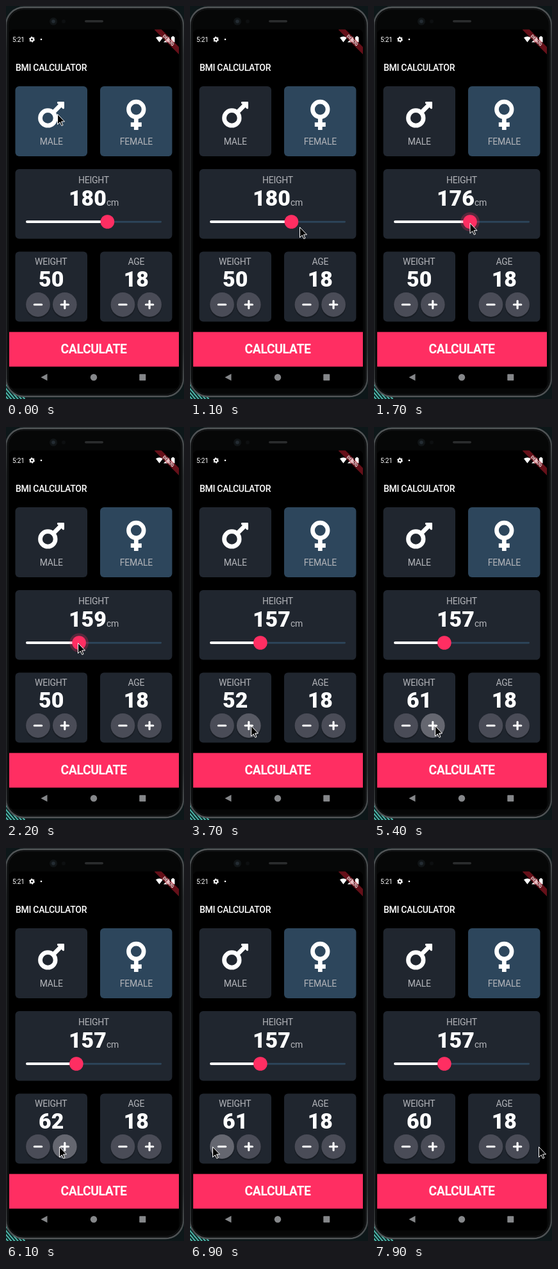
An HTML page for the animation above (8 s loop, 278 by 612 pixels).

```html
<!DOCTYPE html>
<html lang="en">
<head>
<meta charset="utf-8">
<title>BMI Calculator</title>
<style>
  html, body { margin: 0; width: 100%; height: 100%; overflow: hidden; background: #0d1719; }
  svg { display: block; width: 278px; height: 612px; }
  text { font-family: Roboto, sans-serif; fill: #fff; }
  .mid { text-anchor: middle; }
  .label { font-size: 14px; font-weight: 400; letter-spacing: -.25px; fill: #b2b4b9; }
  .number { font-size: 33.9px; font-weight: 900; letter-spacing: 0; }
  .card { fill: #20262f; }
  .active { fill: #2d465c; }
  .accent { fill: #ff2e62; }
  .icon { fill: none; stroke: #fff; stroke-width: 6.75; }
  .button { fill: #4a4c57; }
  .sign { stroke: #fff; stroke-width: 3.2; stroke-linecap: round; }
  .nav { fill: #85878a; }
</style>
</head>
<body>
<svg viewBox="0 0 278 612">
  <defs>
    <pattern id="hatch" width="4" height="4" patternUnits="userSpaceOnUse" patternTransform="rotate(-40)">
      <rect width="4" height="4" fill="#0c2626"/>
      <rect width="1.8" height="4" fill="#55c4b6"/>
    </pattern>
    <linearGradient id="rim" x2="0" y2="1">
      <stop stop-color="#54585a"/>
      <stop offset=".12" stop-color="#2b2e30"/>
      <stop offset=".88" stop-color="#2b2e30"/>
      <stop offset="1" stop-color="#515557"/>
    </linearGradient>
    <clipPath id="screen"><rect x="5" y="36.5" width="265" height="559" rx="7"/></clipPath>
    <g id="round">
      <circle cy="2" r="19.4" fill="#000" opacity=".22"/>
      <circle class="button" r="18.9"/>
    </g>
    <path id="minus" class="sign" d="M-5.7 0H5.7"/>
    <path id="plus" class="sign" d="M-5.7 0H5.7M0-5.7V5.7"/>
  </defs>

  <!-- phone shell -->
  <rect y="588" width="30" height="24" fill="url(#hatch)"/>
  <rect x="0" y="2" width="277" height="606" rx="28" fill="#0b0c0d" stroke="url(#rim)" stroke-width="2.4"/>
  <rect x="3" y="5" width="271" height="600" rx="25" fill="#060707" stroke="#17191a"/>
  <circle cx="74" cy="24" r="6" fill="#111517"/>
  <circle cx="74" cy="24" r="2.8" fill="#242c33"/>
  <circle cx="90" cy="24" r="3" fill="#0d0f10"/>
  <rect x="123" y="22" width="29" height="3.6" rx="1.8" fill="#2b2d2e"/>
  <rect x="5" y="36.5" width="265" height="559" rx="7" fill="#000"/>

  <!-- status bar -->
  <text x="10" y="55.6" font-size="10" letter-spacing="-.15">5:21</text>
  <circle cx="40.5" cy="52" r="2.5" fill="none" stroke="#fff" stroke-width="2"/>
  <circle cx="40.5" cy="52" r="3.8" fill="none" stroke="#fff" stroke-width="1.3" stroke-dasharray="2 1.98"/>
  <circle cx="55" cy="52" r="1.3" fill="#fff"/>
  <path d="M234 49.3Q239.5 45.5 245 49.3L239.5 56.5ZM255 47.5V56.5H246ZM258 48.3H259.6V47H261.9V48.3H263.5V56.5H258Z" fill="#fff"/>
  <g clip-path="url(#screen)">
    <g transform="translate(270 37) rotate(45)">
      <rect x="-27" y="18.9" width="54" height="8.1" fill="#a81c2a" opacity=".6"/>
      <text class="mid" y="25.4" font-size="6.9" font-weight="900" opacity=".8">DEBUG</text>
    </g>
  </g>

  <text x="15" y="101.3" font-size="14" font-weight="500" letter-spacing="-.3">BMI CALCULATOR</text>

  <!-- gender -->
  <rect id="male" class="card" x="14.5" y="125" width="112.5" height="109" rx="6"/>
  <g class="icon">
    <circle cx="65.3" cy="174.4" r="11.8"/>
    <path d="M75 164.7L86 153.7"/>
  </g>
  <path d="M81 149H90Q91 149 91 150V159Q90.4 161 88.7 159.9L80.1 151.2Q79.2 149.4 81 149Z" fill="#fff"/>
  <text class="label mid" x="70.7" y="216.3">MALE</text>

  <rect class="active" x="147" y="125" width="112.5" height="109" rx="6"/>
  <g class="icon">
    <circle cx="203.3" cy="161" r="11.8"/>
    <path d="M203.3 174V193M194.8 184.6H211.8"/>
  </g>
  <text class="label mid" x="203.3" y="216.3">FEMALE</text>

  <!-- height -->
  <rect class="card" x="14.5" y="254" width="245" height="108.5" rx="6"/>
  <text class="label mid" x="137" y="276.3">HEIGHT</text>
  <text class="mid" x="137" y="310.6"><tspan id="height" class="number">180</tspan><tspan class="label">cm</tspan></text>
  <rect class="active" x="32" y="334.7" width="211" height="2.7" rx="1.3"/>
  <rect id="track" x="31" y="334" height="4" rx="2" fill="#fff"/>
  <g id="thumb">
    <circle id="ripple" class="accent" r="14.8"/>
    <circle class="accent" r="10.8"/>
  </g>

  <!-- weight and age -->
  <rect class="card" x="14.5" y="382.5" width="112.5" height="109" rx="6"/>
  <text class="label mid" x="70.3" y="402.6">WEIGHT</text>
  <text id="weight" class="number mid" x="70.7" y="436.7">50</text>
  <rect class="card" x="147" y="382.5" width="112.5" height="109" rx="6"/>
  <text class="label mid" x="203.3" y="402.6">AGE</text>
  <text class="number mid" x="203.3" y="436.7">18</text>
  <g transform="translate(50 465)">
    <use href="#round"/><circle id="minusGlow" r="18.9" fill="#fff"/><use href="#minus"/>
  </g>
  <g transform="translate(91.8 465)">
    <use href="#round"/><circle id="plusGlow" r="18.9" fill="#fff"/><use href="#plus"/>
  </g>
  <g transform="translate(182.4 465)"><use href="#round"/><use href="#minus"/></g>
  <g transform="translate(224.1 465)"><use href="#round"/><use href="#plus"/></g>

  <rect class="accent" x="5" y="507.6" width="265" height="54"/>
  <text class="mid" x="137" y="541.2" font-size="19.4" font-weight="700" letter-spacing="-.4">CALCULATE</text>

  <!-- navigation -->
  <path class="nav" d="M64.5 572.8V583.6L54.5 578.2Z"/>
  <circle class="nav" cx="137" cy="578.3" r="5.2"/>
  <rect class="nav" x="208.3" y="573.3" width="10" height="10" rx=".8"/>

  <path id="cursor" d="M.5 .5V16.5L4.2 13L6.8 18.5L9 17.5L6.5 12H11.5Z" fill="#000" stroke="#fff"/>
</svg>
<script>
  const LOOP = 8000, STEP = 100;
  const el = id => document.getElementById(id);

  // Pointer stops: [time, x, y]
  const path = [
    [0, 80, 168], [100, 71, 168], [500, 71, 168], [800, 112, 232], [1100, 171, 344],
    [1300, 177, 351], [1400, 171, 345], [1600, 157, 338], [2200, 112, 336], [2300, 108, 337],
    [2400, 107, 342], [2700, 82, 430], [3000, 95, 465], [6000, 95, 465], [6200, 71, 465],
    [6300, 71, 465], [6500, 35, 465], [7400, 35, 465], [7500, 39, 465], [7600, 104, 459],
    [7700, 205, 457], [7800, 265, 462], [7900, 257, 465]
  ];
  const plusClicks = [3400, 3700, 3900, 4000, 4200, 4400, 4600, 4700, 4900, 5100, 5300, 5900];
  const minusClicks = [6700, 7100];

  function pointerAt(t) {
    const i = path.findIndex(p => p[0] >= t);
    if (i < 1) return path[0].slice(1);
    const [t0, x0, y0] = path[i - 1], [t1, x1, y1] = path[i];
    const k = (t - t0) / (t1 - t0);
    return [x0 + (x1 - x0) * k, y0 + (y1 - y0) * k];
  }

  const countUntil = (clicks, t) => clicks.filter(c => c <= t).length;

  function glow(clicks, t) {
    const n = countUntil(clicks, t);
    if (!n) return 0;
    const age = t - clicks[n - 1];
    if (age < 100) return .08;
    return .15 * Math.max(0, Math.min(1, (500 - age) / 200));
  }

  function heightAt(t) {
    if (t < 1600) return 180;
    if (t >= 2300) return 157;
    return Math.round(120 + (pointerAt(t)[0] + 1.5 - 32) / 2.11);
  }

  function draw(t) {
    const [x, y] = pointerAt(t);
    const height = heightAt(t), thumbX = 31.8 + (height - 120) * 2.11;
    el("cursor").setAttribute("transform", `translate(${x} ${y})`);
    el("male").setAttribute("class", t < 600 ? "active" : "card");
    el("height").textContent = height;
    el("track").setAttribute("width", thumbX - 31);
    el("thumb").setAttribute("transform", `translate(${thumbX} 336)`);
    el("ripple").setAttribute("opacity", t >= 1600 && t < 2400 ? .25 : t === 2400 ? .1 : 0);
    el("weight").textContent = 50 + countUntil(plusClicks, t) - countUntil(minusClicks, t);
    el("plusGlow").setAttribute("opacity", glow(plusClicks, t));
    el("minusGlow").setAttribute("opacity", glow(minusClicks, t));
  }

  function tick() {
    draw(Math.floor(performance.now() % LOOP / STEP) * STEP);
    requestAnimationFrame(tick);
  }
  tick();
</script>
</body>
</html>
```
